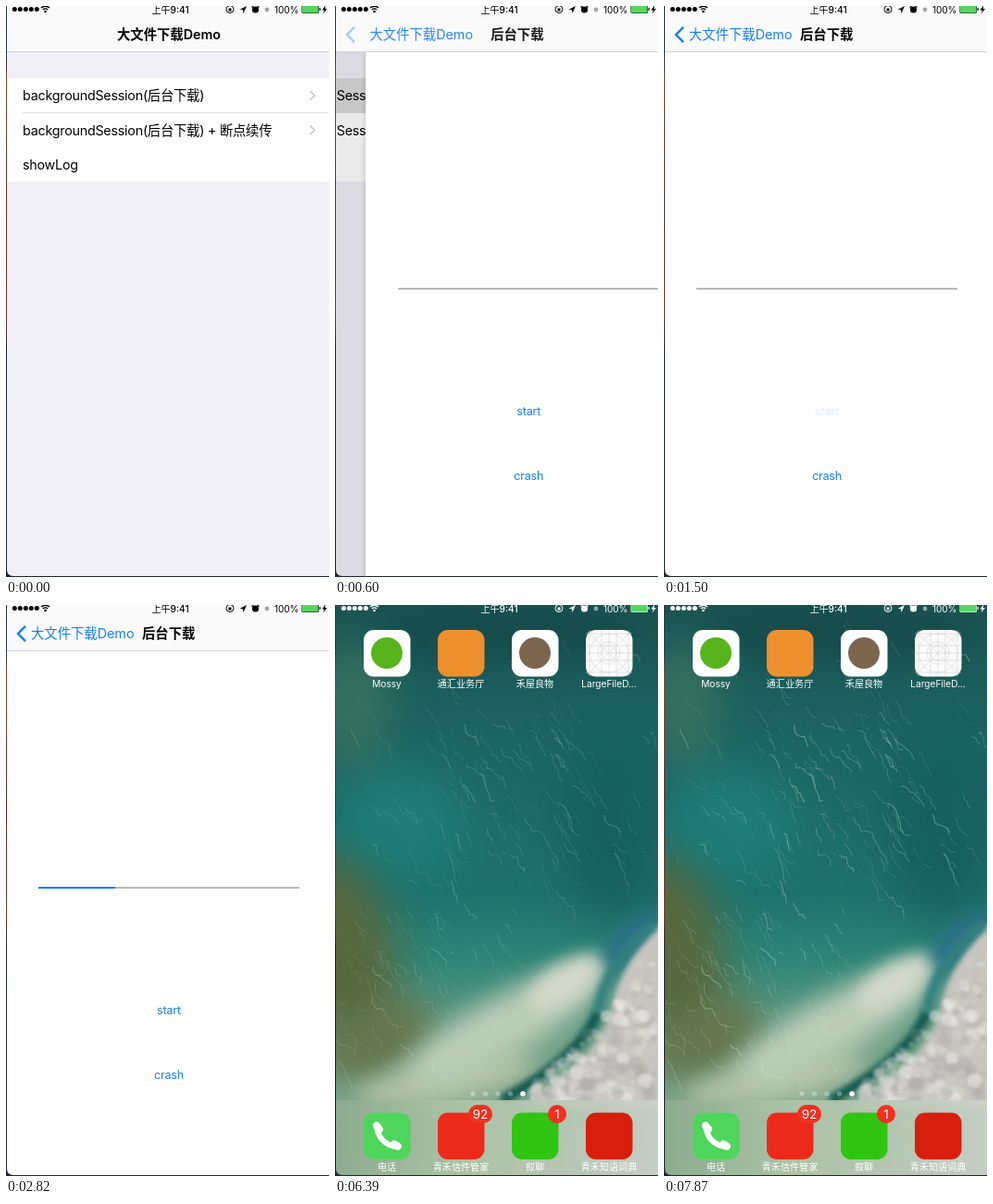
An HTML page with a canvas that plays this animation: 349 by 618 pixels, repeating every 8 s.

```html
<!DOCTYPE html>
<html lang="zh-CN">
<head>
<meta charset="utf-8">
<style>
  html, body { margin: 0; width: 349px; height: 618px; overflow: hidden; background: #fff; }
  canvas { display: block; }
</style>
</head>
<body>
<canvas id="stage" width="349" height="618"></canvas>
<script>
const W = 349, H = 618, LOOP = 8000, TAU = Math.PI * 2;
const FONT = '"Inter", "Noto Sans CJK SC", "Noto Sans CJK", sans-serif';
const BLUE = '#157efb';
const ctx = document.getElementById('stage').getContext('2d');

const clamp = v => Math.max(0, Math.min(1, v));
const ramp = (t, a, b) => clamp((t - a) / (b - a));

let seed = 7;
const rnd = (a = 0, b = 1) => {
  seed = (seed * 16807) % 2147483647;
  return a + (b - a) * seed / 2147483647;
};

function text(s, x, y, size, color, { weight = 400, align = 'left', alpha = 1, spacing = 0 } = {}) {
  ctx.globalAlpha = alpha;
  ctx.font = `${weight} ${size}px ${FONT}`;
  ctx.letterSpacing = spacing + 'px';
  ctx.textAlign = align;
  ctx.fillStyle = color;
  ctx.fillText(s, x, y);
  ctx.globalAlpha = 1;
}

function rect(x, y, w, h, color) {
  ctx.fillStyle = color;
  ctx.fillRect(x, y, w, h);
}

function round(x, y, w, h, r, color) {
  ctx.fillStyle = color;
  ctx.beginPath();
  ctx.roundRect(x, y, w, h, r);
  ctx.fill();
}

function disc(x, y, r, color) {
  ctx.fillStyle = color;
  ctx.beginPath();
  ctx.arc(x, y, r, 0, TAU);
  ctx.fill();
}

function line(points, color, width) {
  ctx.strokeStyle = color;
  ctx.lineWidth = width;
  ctx.beginPath();
  points.forEach(([x, y]) => ctx.lineTo(x, y));
  ctx.stroke();
}

function poly(points, color) {
  ctx.fillStyle = color;
  ctx.beginPath();
  points.forEach(([x, y]) => ctx.lineTo(x, y));
  ctx.fill();
}

function gradient(x, y, colors) {
  const g = ctx.createLinearGradient(0, 0, x, y);
  colors.forEach(([at, c]) => g.addColorStop(at, c));
  return g;
}

function layer(paint) {
  const c = document.createElement('canvas');
  c.width = W;
  c.height = H;
  paint(c.getContext('2d'));
  return c;
}

// Wallpaper: soft sea, wave and foam
const sea = layer(c => {
  c.fillStyle = gradient(0, H, [[0, '#1a5452'], [.25, '#1c6664'], [.5, '#1e716b'],
    [.62, '#2e8577'], [.76, '#6b9d85'], [1, '#8fae95']]);
  c.fillRect(0, 0, W, H);
  const blob = (x, y, rx, ry, turn, color, blur) => {
    c.filter = `blur(${blur}px)`;
    c.fillStyle = color;
    c.beginPath();
    c.ellipse(x, y, rx, ry, turn, 0, TAU);
    c.fill();
  };
  blob(190, 30, 150, 28, 0, '#174b4c', 18);
  blob(300, 230, 60, 110, 0, '#17605e', 24);
  blob(20, 110, 40, 70, 0, '#37705f', 22);
  blob(70, 240, 70, 60, 0, '#1f7d78', 24);
  blob(10, 380, 55, 110, -.2, '#58683f', 22);
  blob(45, 470, 65, 36, -.4, '#66764e', 18);
  blob(120, 515, 100, 24, -.2, '#b0c0a4', 12);
  blob(185, 455, 120, 32, -.5, '#bccdb8', 14);
  blob(250, 408, 48, 20, -.55, '#d3d8ca', 9);
  blob(322, 362, 40, 16, -.7, '#2d6f8c', 9);

  c.filter = 'blur(3px)';
  c.fillStyle = '#c9c6c1';
  c.beginPath();
  c.moveTo(200, 545);
  c.quadraticCurveTo(290, 490, 300, 430);
  c.quadraticCurveTo(310, 385, 355, 342);
  c.lineTo(355, 545);
  c.fill();
  c.strokeStyle = '#12584f';
  c.lineWidth = 11;
  c.beginPath();
  c.moveTo(180, 536);
  c.quadraticCurveTo(265, 490, 284, 440);
  c.stroke();
  c.strokeStyle = '#33807e';
  c.beginPath();
  c.moveTo(284, 440);
  c.quadraticCurveTo(290, 392, 345, 345);
  c.stroke();

  c.filter = 'blur(1.5px)';
  for (let i = 0; i < 190; i++) {
    const x = rnd(215, 349);
    const top = 362 + 175 * ((349 - x) / 149) ** .8;
    c.globalAlpha = rnd(.15, .5);
    c.fillStyle = rnd() < .6 ? '#f0eeea' : '#a9aaa8';
    c.beginPath();
    c.arc(x, rnd(top, 540), rnd(2, 8), 0, TAU);
    c.fill();
  }
});

// Fine white water lines running down to the right
const spray = layer(c => {
  c.strokeStyle = '#d5e9dc';
  const areas = [[110, 260, 110, 280, 80], [180, 345, 15, 330, 70],
    [5, 140, 20, 300, 50], [0, 190, 320, 520, 130]];
  for (const [x0, x1, y0, y1, count] of areas) {
    for (let i = 0; i < count; i++) {
      let x = rnd(x0, x1), y = rnd(y0, y1);
      c.globalAlpha = rnd(.05, .38);
      c.lineWidth = rnd(.4, 1.2);
      c.beginPath();
      c.moveTo(x, y);
      for (let k = rnd(2, 7); k > 0; k--) c.lineTo(x += rnd(0, 5), y += rnd(-1, 8));
      c.stroke();
    }
  }
});

function statusBar(color, dim) {
  for (let i = 0; i < 5; i++) disc(9.3 + i * 6, 3.4, 2.5, color);
  ctx.strokeStyle = color;
  ctx.lineWidth = 1.4;
  for (const r of [3.6, 6.4]) {
    ctx.beginPath();
    ctx.arc(42.5, 6.6, r, -2.35, -.79);
    ctx.stroke();
  }
  disc(42.5, 6, 1.3, color);
  text('上午9:41', 177.5, 7.6, 10.1, color, { weight: 500, align: 'center' });

  ctx.lineWidth = 1;
  ctx.beginPath();
  ctx.arc(242, 3.5, 4, 0, TAU);
  ctx.stroke();
  rect(240.5, 2.5, 3, 3, color);
  poly([[252.5, 4], [260, 0], [256.5, 8], [256, 4.3]], color);
  disc(269.5, 4, 3.6, color);
  line([[265.5, 1.5], [267.5, 0]], color, 1.2);
  line([[273.5, 1.5], [271.5, 0]], color, 1.2);
  disc(282, 4, 2.4, dim);
  text('100%', 290, 7.6, 10.1, color, { spacing: -.1 });
  round(319.5, -1, 18.5, 9, 1.5, color);
  rect(320, -1, 17.5, 8.5, '#55d65f');
  rect(338.5, 2, 1.2, 3, color);
  poly([[345.5, -1], [341.5, 4.5], [344, 4.5], [342.5, 8.5], [347, 3], [344.6, 3]], color);
}

function list(p, selected) {
  const x = -.3 * W * p;
  rect(0, 0, W, H, '#f0eff5');
  rect(0, 78, W, 112, '#fff');
  if (selected) rect(0, 78, W, 38, '#d9d9d9');
  else rect(18, 115, W, 1, '#e3e3e6');
  const rows = ['backgroundSession(后台下载)', 'backgroundSession(后台下载) + 断点续传', 'showLog'];
  rows.forEach((s, i) => {
    const y = 97 + i * 37.2;
    text(s, x + 18, y + 5.3, 14.33, '#000', { spacing: -.25 });
    if (i < 2) line([[x + 328.5, y - 4.8], [x + 333.3, y], [x + 328.5, y + 4.8]], '#c7c7cc', 1.6);
  });
  if (p) rect(0, 0, W, H, `rgba(0,0,20,${.09 * p})`);
}

function download(t, x) {
  if (x > .5) {
    for (let i = 1; i < 6; i++) rect(x - i, 50, 1, H, `rgba(0,0,0,${.09 - i * .015})`);
  }
  rect(x, 0, W, H, '#fefefe');
  rect(x + 35, 305, 282, 2, '#b7b7b7');
  rect(x + 35, 305, 83 * ramp(t, 1800, 2820) + 104 * ramp(t, 2820, 3870), 2, BLUE);
  const button = (s, y, alpha) =>
    text(s, x + 176, y, 12.65, BLUE, { align: 'center', spacing: -.25, alpha });
  button('start', 443.4, t >= 1500 && t < 1800 ? .15 : 1);
  button('crash', 513.4, 1 - .85 * ramp(t, 3720, 4170));
}

function navBar(p) {
  rect(0, 0, W, 49, '#fafafb');
  rect(0, 49, W, 1, '#d2d2d5');
  const y = 35.9, back = 27 + 93 * (1 - p ** 1.2), name = '大文件下载Demo';
  text(name, back, y, 14.33, '#000', { weight: 600, alpha: (1 - p) ** 1.6 });
  if (p) {
    text(name, back, y, 14.33, BLUE, { alpha: p });
    text('后台下载', 147 + 222 * (1 - p), y, 14.33, '#000', { weight: 600, alpha: p });
    ctx.globalAlpha = p ** 10;
    line([[21, 22.8], [13, 31], [21, 39.2]], BLUE, 2.5);
    ctx.globalAlpha = 1;
  }
  statusBar('#000', '#a5a5a8');
}

const icons = [
  { name: 'Mossy', tile: '#fff', mark: '#58b41c' },
  { name: '通汇业务厅', tile: '#ee8f2e' },
  { name: '禾屋良物', tile: '#fff', mark: '#7d6650' },
  { name: 'LargeFileD...', tile: '#fbfbfb', paint: grid },
  { name: '电话', tile: '#4fd55c', paint: handset },
  { name: '青禾信件管家', tile: '#ec2a1c', badge: '92' },
  { name: '叙聊', tile: '#2fc512', badge: '1' },
  { name: '青禾知语词典', tile: '#d81e0c' }
];

function grid(x, y) {
  for (const d of [4, 17, 25, 33, 46]) {
    line([[x + d, y], [x + d, y + 50]], '#d4d4d4', .6);
    line([[x, y + d], [x + 50, y + d]], '#d4d4d4', .6);
  }
  line([[x + 2, y + 2], [x + 48, y + 48]], '#d4d4d4', .6);
  line([[x + 48, y + 2], [x + 2, y + 48]], '#d4d4d4', .6);
  for (const r of [8, 12, 21]) {
    ctx.beginPath();
    ctx.arc(x + 25, y + 25, r, 0, TAU);
    ctx.stroke();
  }
}

function handset(x, y) {
  ctx.lineCap = 'round';
  ctx.strokeStyle = '#fff';
  ctx.lineWidth = 6;
  ctx.beginPath();
  ctx.moveTo(x + 14, y + 14);
  ctx.quadraticCurveTo(x + 16, y + 34, x + 36, y + 37);
  ctx.stroke();
  line([[x + 14, y + 14], [x + 17, y + 18]], '#fff', 8);
  line([[x + 33, y + 34], [x + 37, y + 36.5]], '#fff', 8);
  ctx.lineCap = 'butt';
}

function home(t) {
  ctx.drawImage(sea, 0, 0);
  ctx.globalAlpha = .65 + .35 * ramp(t, 6390, 7420);
  ctx.drawImage(spray, 0, 0);
  ctx.globalAlpha = 1;
  for (let i = 0; i < 5; i++) {
    disc(149 + i * 13.5, 529, 2.8, i < 4 ? 'rgba(255,255,255,.3)' : '#fff');
  }
  ctx.globalAlpha = .9;
  rect(0, 536, W, 82, gradient(W, 0, [[0, '#8dab8f'], [.4, '#b0c5a9'], [.7, '#b9c9b5'], [1, '#cdd1ca']]));
  ctx.globalAlpha = 1;
  icons.forEach(({ name, tile, mark, paint, badge }, i) => {
    const x = 31 + i % 4 * 80, y = i < 4 ? 27 : 549.5;
    round(x, y, 50.5, 50.5, 11, tile);
    if (mark) disc(x + 25, y + 25, 17, mark);
    if (paint) paint(x, y);
    if (badge) {
      const w = badge.length > 1 ? 26 : 20;
      round(x + 59 - w, 541, w, 20, 10, '#f1301f');
      text(badge, x + 59 - w / 2, 555.8, 13.5, '#fff', { align: 'center' });
    }
    text(name, x + 25, i < 4 ? 89.3 : 611.6, 10.1, '#fff', { align: 'center' });
  });
  statusBar('#fff', 'rgba(255,255,255,.5)');
}

function edges() {
  rect(0, 0, 1, H, gradient(0, H, [[0, '#2a3340'], [.08, '#23384a'], [.13, '#7d4530'],
    [.35, '#5b2f28'], [.54, '#6b3b2c'], [.6, '#20242e'], [1, '#1a2330']]));
  ctx.fillStyle = '#1d2733';
  ctx.beginPath();
  ctx.moveTo(0, 610);
  ctx.lineTo(1, 610);
  ctx.quadraticCurveTo(1, 617, 8, 617);
  ctx.lineTo(W, 617);
  ctx.lineTo(W, H);
  ctx.lineTo(0, H);
  ctx.fill();
}

const step = t => {
  const from = t < 2820 ? 0 : 2820;
  return from + Math.floor((t - from) / 150) * 150;
};

function draw(now) {
  const real = now % LOOP;
  if (real >= 6390) {
    home(real);
  } else {
    const t = step(real);
    const p = t < 415 ? 0 : t >= 1200 ? 1 : 1 - Math.exp((415 - t) / 78.7);
    if (p < 1) list(p, t >= 300);
    if (p > 0) download(t, W * (1 - p));
    navBar(p);
  }
  edges();
  requestAnimationFrame(draw);
}

const start = performance.now();
requestAnimationFrame(function first(now) {
  const shift = Math.min(start, now);
  const tick = draw;
  draw = n => tick(Math.max(0, n - shift));
  draw(now);
});
</script>
</body>
</html>
```
